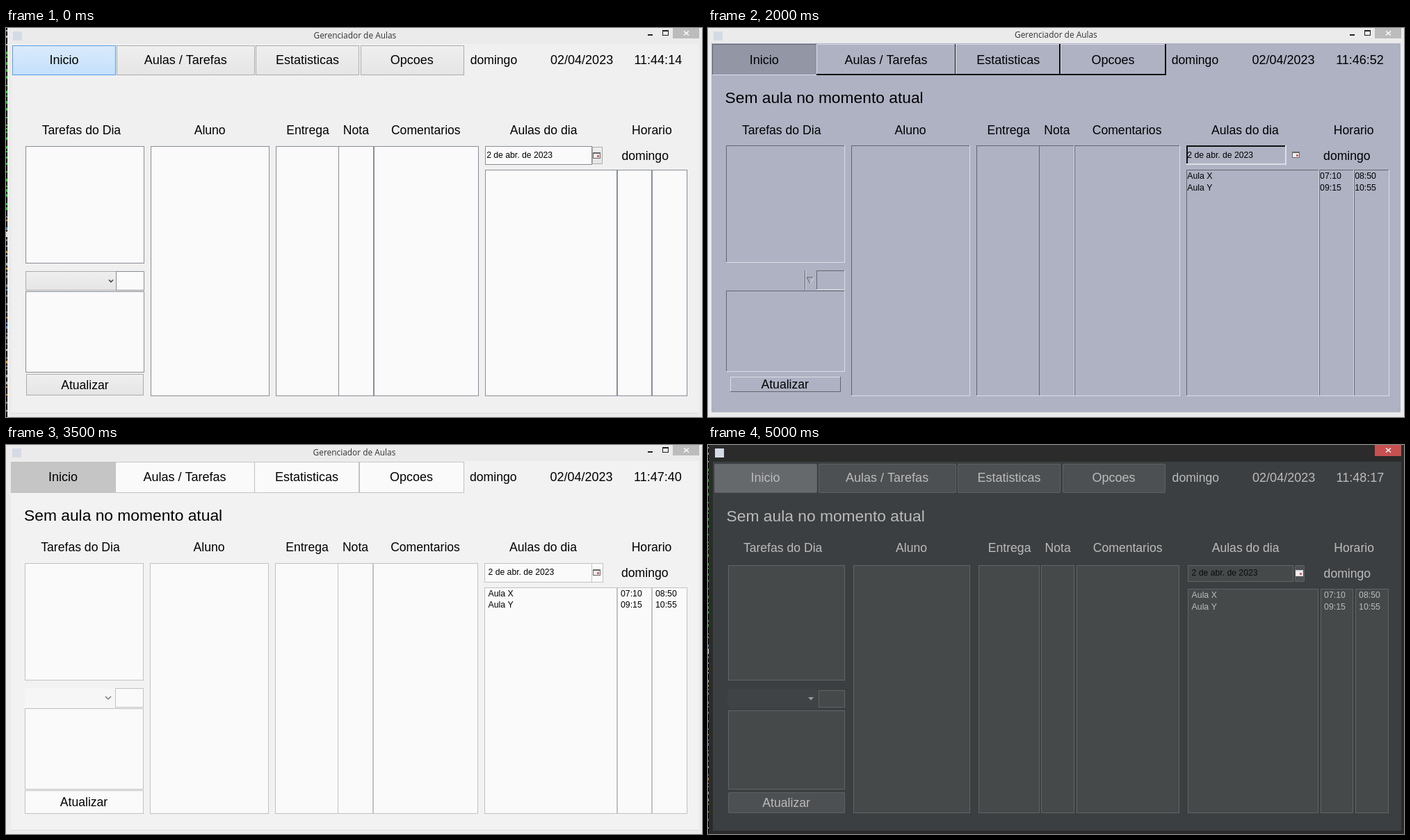
An HTML page with a canvas for the animation above (5500 ms loop, 1001 by 560 pixels).

```html
<!DOCTYPE html>
<html lang="pt">
<head>
<meta charset="utf-8">
<title>Gerenciador de Aulas</title>
<style>
html, body { margin: 0; width: 100%; height: 100%; overflow: hidden; }
canvas { display: block; }
</style>
</head>
<body>
<canvas id="stage" width="1001" height="560"></canvas>
<script>
const ctx = document.getElementById('stage').getContext('2d');
const STEP = 500;
const SANS = '"Liberation Sans", Arial, sans-serif';

// Edge: [top-left colour, bottom-right colour, top-left width, bottom-right width]
const line = c => [c, c, 1, 1];

const base = {
  a: 0, b: 0, dy: 0, inset: 0, btnInset: 0, radius: 0, pad: 5.5,
  bg: '#f2f2f2', fg: '#000', dateFg: '#000', frame: '#ebebeb',
  list: '#fafafa', listEdge: line('#c2c2c2'),
  btn: ['#fafafa', '#fafafa'], btnEdge: line('#c2c2c2'),
  sel: ['#c5c5c5', '#c5c5c5'], selEdge: line('#c2c2c2'),
  combo: 'chevron', comboFill: '#f6f6f6', arrow: '#666', dateEnd: 842, data: true
};
const gaps = { inset: 1.5, btnInset: 1.5, radius: 2 };
const dark = {
  ...base, dark: true, bg: '#3c3f41', fg: '#bbb', dateFg: '#0c0c0c',
  frame: '#2b2b2b', list: '#45494a', listEdge: line('#626466'),
  btn: ['#4d5052', '#4d5052'], btnEdge: line('#5f6264'),
  sel: ['#66696c', '#66696c'], selEdge: line('#5f6264'),
  comboFill: '#404345', arrow: '#9a9da0'
};
const mac = { ...base, ...gaps, a: -1, b: 1, radius: 5, combo: 'mac' };

const themes = [
  { ...base, clock: '11:44:14', a: 1.5, b: -1.2, dy: -1.2, btnInset: 1, pad: 2.5, strip: 2, data: false,
    bg: '#f0f0f0', listEdge: line('#8a8e98'), btn: ['#efefef', '#e5e5e5'], btnEdge: line('#acacac'),
    sel: ['#daebfc', '#c4e0fc'], selEdge: line('#569de5'), combo: 'win', arrow: '#444' },
  { ...base, clock: '11:46:22', a: 1.5, b: -1.2, dy: -1.2, btnInset: 2, radius: 5, pad: 4, strip: 2,
    bg: '#d6d9df', list: '#fff', listEdge: line('#9297a1'), btn: ['#f4f5f8', '#d0d4dc'],
    btnEdge: line('#8e949e'), sel: ['#8d98ab', '#a5b0c2'], selEdge: line('#5f6776'), combo: 'win', arrow: '#333' },
  { ...base, clock: '11:46:37', a: -.8, b: .9, dy: -.3, pad: 2,
    bg: '#f0f0f0', list: '#fff', listEdge: ['#868686', '#f8f8f8', 2, 1],
    btn: ['#f0f0f0', '#f0f0f0'], btnEdge: ['#fff', '#777', 1, 2],
    sel: ['#f9f7f3', '#f9f7f3'], selEdge: ['#777', '#fff', 1, 1], combo: 'classic', arrow: '#5c5c5c', dateEnd: 839 },
  { ...base, clock: '11:46:45', a: -.8, b: .9, dy: -1, pad: 2,
    bg: '#eee', list: '#fff', listEdge: line('#7a8a99'), btn: ['#f5f8fb', '#cbdbea'],
    btnEdge: line('#7a8a99'), sel: ['#b8cfe5', '#b8cfe5'], selEdge: line('#7a8a99'), combo: 'win', arrow: '#333' },
  { ...base, clock: '11:46:52', a: -1.5, b: 1.8, dy: -1.6, pad: 1.5,
    bg: '#aeb2c3', list: '#aeb2c3', listEdge: ['#62656f', '#dcdee5', 1, 1],
    btn: ['#aeb2c3', '#aeb2c3'], btnEdge: ['#dcdee5', '#111', 1, 2],
    sel: ['#9296a5', '#9296a5'], selEdge: ['#62656f', '#dcdee5', 1, 1],
    combo: 'motif', arrow: '#62656f', dateEnd: 831, motif: true },
  { ...mac, clock: '11:47:02', bg: '#f4f4f4', comboFill: '#fff' },
  { ...dark, ...gaps, clock: '11:47:11', a: 1.5, b: 2.5, dy: -.3, radius: 5, strip: 2, combo: 'mac',
    bg: '#1e1e1e', fg: '#dedede', list: '#282828', listEdge: line('#363636'),
    btn: ['#565656', '#565656'], btnEdge: line('#565656'),
    sel: ['#878787', '#878787'], selEdge: line('#878787'), comboFill: '#565656' },
  { ...base, clock: '11:47:40', dy: -1 },
  { ...dark, clock: '11:47:55' },
  { ...base, ...gaps, clock: '11:48:09', a: -.3, b: -1.2, dy: -1.5, combo: 'triangle' },
  { ...dark, ...gaps, clock: '11:48:17', a: .6, strip: 1, combo: 'triangle' }
];

let t;
const X = x => x + t.a + t.b * x / 1000;
const Y = y => y + t.dy;

function rect(x0, y0, x1, y1, fill) {
  ctx.fillStyle = fill;
  ctx.fillRect(x0, y0, x1 - x0, y1 - y0);
}

function text(s, x, y, size, align = 'left', color = t.fg, font = SANS) {
  ctx.font = `${size}px ${font}`;
  ctx.textAlign = align;
  ctx.textBaseline = 'alphabetic';
  ctx.fillStyle = color;
  ctx.fillText(s, X(x), Math.round(Y(y) + size * .355));
}

function path(points, color, width) {
  ctx.beginPath();
  points.forEach(([x, y]) => ctx.lineTo(x, y));
  if (width) {
    ctx.strokeStyle = color;
    ctx.lineWidth = width;
    ctx.stroke();
  } else {
    ctx.fillStyle = color;
    ctx.fill();
  }
}

function box(x0, y0, x1, y1, fill, [tl, br, tw, bw], inset = 0, radius = 0) {
  const l = Math.round(X(x0) + inset), r = Math.round(X(x1) - inset) + 1;
  const u = Math.round(Y(y0) + inset), d = Math.round(Y(y1) - inset);
  if (Array.isArray(fill)) {
    const g = ctx.createLinearGradient(0, u, 0, d);
    fill.forEach((c, i) => g.addColorStop(i, c));
    fill = g;
  }
  if (radius) {
    const round = (m, c) => {
      ctx.beginPath();
      ctx.roundRect(l + m, u + m, r - l - 2 * m, d - u - 2 * m, radius - m / 2);
      ctx.fillStyle = c;
      ctx.fill();
    };
    round(0, tl);
    round(1, fill);
    return;
  }
  rect(l, u, r, d, br);
  rect(l, u, r - bw, d - bw, tl);
  rect(l + tw, u + tw, r - bw, d - bw, fill);
}

const list = (x0, y0, x1, y1) => box(x0, y0, x1, y1, t.list, t.listEdge, t.inset);
const button = (x0, y0, x1, y1) => box(x0, y0, x1, y1, t.btn, t.btnEdge, t.btnInset, t.radius);

function chevron(x, y, w, h, color, width = 1.4) {
  path([[x - w, y - h], [x, y + h], [x + w, y - h]], color, width);
}

function windowFrame() {
  rect(0, 0, 1001, 560, t.frame);
  const left = Math.round(X(6.5)), right = Math.round(X(996));
  const top = Math.round(Y(24)), bottom = Math.round(Y(556));
  rect(left, top, right, bottom, t.bg);
  rect(left, bottom - 1, right, bottom, t.dark ? '#303234' : '#dcdcdc');

  const iconX = Math.round(X(15));
  rect(iconX - 6, 5, iconX + 7, 18, '#d5dbe4');

  const close = Math.round(X(977.5));
  rect(close - 19, 0, close + 19, t.dark ? 16 : 15, t.dark ? '#c75050' : '#bcbcbc');
  path([[close - 3, 4.5], [close + 4, 10.5]], '#fff', 1.5);
  path([[close + 4, 4.5], [close - 3, 10.5]], '#fff', 1.5);
  if (!t.dark) {
    text('Gerenciador de Aulas', 501, 11.5, 11.9, 'center', '#333', '"Open Sans", sans-serif');
    rect(close - 55, 9, close - 48, 11, '#222');
    rect(close - 34, 3, close - 25, 11, '#222');
    rect(close - 33, 5, close - 26, 10, t.frame);
  }
}

// Sliver of a terminal showing behind the window
function desktopStrip() {
  rect(0, 0, t.strip, 560, '#000');
  for (let y = 3, seed = 7; y < 556; y += 5 + seed % 9) {
    seed = (seed * 73 + 41) % 997;
    const color = y < 28 ? '#bbb' : y < 270 ? '#0c0' : ['#aaa', '#777', '#d80', '#48c'][seed % 4];
    rect(0, y, t.strip, y + 2 + seed % 3, color);
  }
  rect(0, 293, t.strip, 301, '#ddd');
}

function combo() {
  const l = Math.round(X(27)), r = Math.round(X(157)), u = Math.round(Y(351)), d = Math.round(Y(379));
  const cx = Math.round(X(147)), cy = Math.round(Y(365));
  if (t.combo === 'win') {
    box(27, 351, 157, 379, t.btn, t.btnEdge);
    chevron(cx + 3, cy, 3, 1.5, t.arrow, 1.6);
  } else if (t.combo === 'classic') {
    rect(l, u, r - 1, d, '#fff');
    box(130.5, 352, 155, 379, t.btn, t.btnEdge);
    path([[cx - 12, cy - 4], [cx + 3, cy - 4], [cx - 4.5, cy + 4]], t.arrow);
  } else if (t.combo === 'motif') {
    rect(cx - 7, u, cx - 6, d, '#62656f');
    rect(cx - 6, u, cx - 5, d, '#dcdee5');
    path([[cx + 5, cy - 4], [cx - 4, cy - 4], [cx + 1, cy + 5]], '#62656f', 1);
    path([[cx + 1, cy + 5], [cx + 6, cy - 4]], '#dcdee5', 1);
  } else if (t.combo === 'mac') {
    box(27, 351, 156, 379, t.comboFill, line(t.dark ? '#666' : '#cfcfcf'));
    rect(r - 18, u + 2, r - 2, d - 2, '#0a7aff');
    chevron(r - 10, cy - 5, 3, -1.5, '#fff');
    chevron(r - 10, cy + 5, 3, 1.5, '#fff');
  } else {
    rect(l, u, r, d, t.comboFill);
    if (t.combo === 'triangle') path([[cx - 4, cy - 2], [cx + 4, cy - 2], [cx, cy + 2.5]], t.arrow);
    else chevron(cx, cy, 4, 2, t.arrow, 1.2);
  }
}

function datePicker() {
  const edge = t.motif ? ['#111', '#dcdee5', 2, 2] : t.listEdge;
  box(688, 171, t.dateEnd, 198.5, t.list, edge, t.inset);
  if (!t.motif) button(t.dateEnd, 171, 858, 198.5);
  text('2 de abr. de 2023', 688 + t.pad + t.inset, 184, 12.2, 'left', t.dateFg);
  const x = Math.round(X(t.motif ? 845 : 849)) - 5, y = Math.round(Y(180));
  rect(x, y, x + 11, y + 9, t.dark ? '#ddd' : '#666');
  rect(x + 1, y + 2, x + 10, y + 8, '#f4eeee');
  rect(x + 6, y + 4, x + 9, y + 7, '#c66');
}

function draw() {
  windowFrame();
  if (t.strip) desktopStrip();

  box(7, 25, 157, 70, t.sel, t.selEdge, t.btnInset, t.radius);
  [[157, 357], [357, 507], [508, 658]].forEach(([l, r]) => button(l, 25, r, 70));
  [['Inicio', 82], ['Aulas / Tarefas', 257], ['Estatisticas', 432.5], ['Opcoes', 583]]
    .forEach(([s, x]) => text(s, x, 47, 18, 'center'));

  text('domingo', 667, 47, 17.6);
  text('02/04/2023', 782.5, 47, 18);
  text(t.clock, 903, 47, 18);
  if (t.data) text('Sem aula no momento atual', 26, 102, 22.8);

  [['Tarefas do Dia', 107], ['Aluno', 292], ['Entrega', 433], ['Nota', 502.5],
   ['Comentarios', 603], ['Aulas do dia', 772.5], ['Horario', 928.5]]
    .forEach(([s, x]) => text(s, x, 148, 17.6, 'center'));
  text('domingo', 885, 185, 17.6);

  list(27, 171, 197, 340);
  combo();
  list(157, 351, 197, 379);
  list(27, 380, 197, 497);
  if (t.motif) box(27, 498, 197, 531.5, t.bg, ['#dcdee5', '#62656f', 1, 1], 6);
  else button(27, 498, 197, 531.5);
  text('Atualizar', 112, 514.5, 17.6, 'center');

  [[207, 377], [387, 477], [477, 527], [528, 678]].forEach(([l, r]) => list(l, 171, r, 531.5));
  datePicker();

  const columns = [[688, 878, 'Aula X', 'Aula Y'], [878.5, 928, '07:10', '09:15'], [928.5, 979, '08:50', '10:55']];
  columns.forEach(([l, r, ...rows]) => {
    list(l, 205.5, r, 531.5);
    if (t.data) rows.forEach((s, i) => text(s, l + t.pad + t.inset, 214.5 + t.inset + i * 16.6, 12.3));
  });
}

function tick(now) {
  t = themes[Math.floor(now / STEP) % themes.length];
  draw();
  requestAnimationFrame(tick);
}
tick(performance.now());
</script>
</body>
</html>
```
